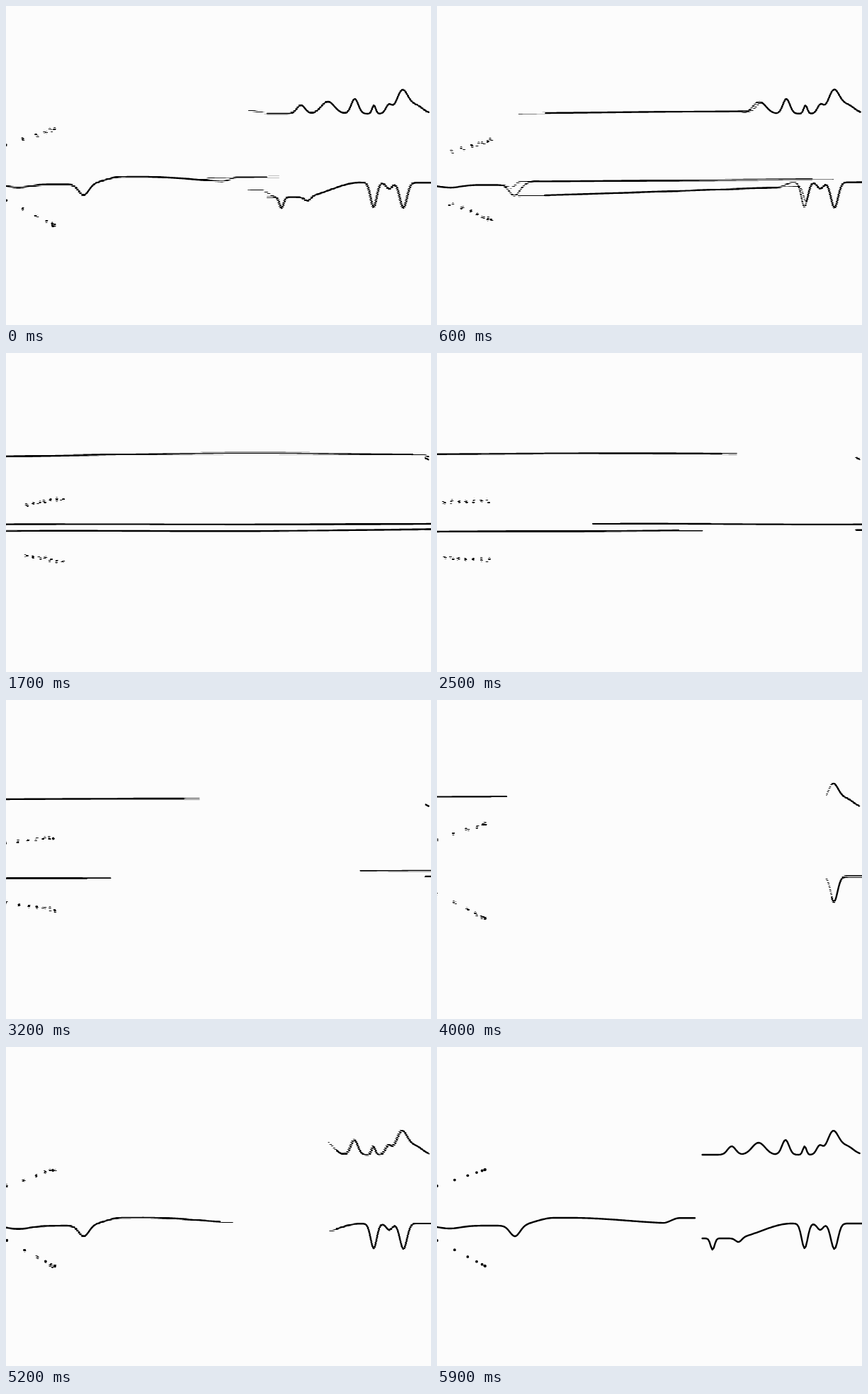
An HTML page with a canvas for the animation above (6 s loop, 600 by 450 pixels).

```html
<!DOCTYPE html>
<html lang="en">
<head>
<meta charset="utf-8">
<title>Line drawing loop</title>
<style>
html, body { margin: 0; width: 100%; height: 100%; overflow: hidden; background: #fcfcfc; }
canvas { display: block; width: 600px; height: 450px; }
</style>
</head>
<body>
<canvas id="stage" width="600" height="450"></canvas>
<script>
const W = 600, H = 450, LOOP = 6, FPS = 10;
const ctx = document.getElementById('stage').getContext('2d');

const ramp = (v, a, b) => Math.max(0, Math.min(1, (v - a) / (b - a)));
const smooth = (v, a, b) => { const k = ramp(v, a, b); return k * k * (3 - 2 * k); };
const mix = (a, b, k) => a + (b - a) * k;
const noise = n => { const v = Math.sin(n * 127.1 + 11.7) * 43758.5453; return (v - Math.floor(v)) * 2 - 1; };

// Bell-shaped hill (negative height) or notch in a line.
const bell = (x, centre, height, width) => height * Math.exp(-(((x - centre) / width) ** 2));

// Piecewise linear travel through [time, x] points.
function travel(u, points) {
  let x = points[0][1];
  for (let i = 1; i < points.length; i++)
    x += (points[i][1] - points[i - 1][1]) * ramp(u, points[i - 1][0], points[i][0]);
  return x;
}

// Both ridges are penned from the right edge, slowly at first.
const penLeft = u => travel(u, [[-2.5, 592], [-.8, 463], [0, 362], [.95, 0]]);

// u runs from -2.6 s (pen down) past 4 s (erased); "settled" tells how far
// the drawn shape has relaxed into the flat line at x.
const strokes = [
  { // upper ridge
    start: penLeft,
    end: u => travel(u, [[1.65, 595], [4.4, 0]]),
    shape: x => 152 + bell(x, 416, -12, 8) + bell(x, 454, -17, 13) + bell(x, 492, -21, 7)
      + bell(x, 519, -12, 3.5) + bell(x, 540, -12, 6) + bell(x, 559, -32, 11) + bell(x, 578, -12, 14),
    flat: (x, u) => 154 - 9 * ramp(u, 1.2, 1.7) - 8 * ramp(u, 1.7, 4)
      + x / W * (9 * ramp(u, 1.2, 2.5) - 6) - 2 * Math.sin(Math.PI * x / W),
    settled: (x, u) => smooth(350 + 150 * u - x, -12, 12)
  },
  { // middle line
    start: () => 0,
    end: u => travel(u, [[-1.9, 0], [-.8, 315], [0, 370], [.8, W], [1.75, W], [3.6, 0]]),
    shape: x => 252 - 11 * smooth(x, 110, 165) + 8 * smooth(x, 190, 350)
      + bell(x, 18, 4, 22) + bell(x, 110, 15, 10),
    flat: (x, u) => 243 + 9 * ramp(u, 0, 1.1) - 3 * x / W,
    settled: (x, u) => smooth(x - 300 + 300 * u, -12, 12)
  },
  { // lower ridge
    start: u => penLeft(u) + travel(u, [[1.9, 0], [3.4, W]]),
    end: () => W,
    shape: x => 270 - 21 * smooth(x, 415, 500) + bell(x, 389, 16, 4) + bell(x, 426, 6, 6)
      + bell(x, 519, 35, 6) + bell(x, 541, 9, 6) + bell(x, 561, 36, 7),
    flat: (x, u) => {
      const k = ramp(u, 1.1, 1.5);
      return 272 - 30 * k + x / W * (19 * k - 20);
    },
    settled: (x, u) => smooth(360 + 240 * u - x, -12, 12)
  }
];

function drawStroke(s, u, seed) {
  const x0 = s.start(u), x1 = s.end(u);
  if (x1 - x0 < 1) return;
  const dx = seed && 1.5 * noise(seed), dy = seed && noise(seed + 5), phase = 3 * noise(seed + 9);
  ctx.beginPath();
  for (let x = x0; x < x1 + 2; x += 2) {
    const y = mix(s.shape(x), s.flat(x, u), s.settled(x, u));
    ctx.lineTo(x + dx, y + dy * Math.sin(x / 110 + phase));
  }
  ctx.stroke();
}

// Dots: a short tilting row that opens into a fan and crowds at its far end.
const DOTS = 7;
const chains = [
  { row: 210, near: 196, far: 173, tilt: 5 },
  { row: 290, near: 273, far: 309, tilt: -5 }
];

function drawDots(c, t, seed) {
  const row = ramp(t, 0, 1.2) * (1 - ramp(t, 1.2, 2.9));
  const open = 1 - ramp(t, 0, 1.2) * (1 - ramp(t, 2.5, 4));
  const tilt = c.tilt * Math.cos(2 * Math.PI * (t - 1.2));
  const jitter = seed && 1.8;
  for (let i = 0; i < DOTS; i++) {
    const even = i / (DOTS - 1);
    const k = mix(even, 1 - (1 - even) ** 2.5, open);
    const x = 42 * row + (68 - 26 * row) * k;
    const y = mix(c.row + tilt * (2 * k - 1), mix(c.near, c.far, k), open);
    ctx.beginPath();
    ctx.arc(x + jitter * noise(seed + i), y + jitter * noise(seed + i + 20), 1.9, 0, 7);
    ctx.fill();
  }
}

function pose(time, seed) {
  const t = (time + LOOP) % LOOP;
  strokes.forEach((s, i) => {
    for (const u of [t, t - LOOP]) drawStroke(s, u, seed && seed + i * 71);
  });
  chains.forEach((c, i) => drawDots(c, t, seed && seed + 300 + i * 40));
}

// Alternate scan lines show two neighbouring poses.
const fields = [0, 1].map(parity => {
  const path = new Path2D();
  for (let y = 0; y < H; y++)
    if (Math.floor(y / 1.25) % 2 === parity) path.rect(0, y, W, 1);
  return path;
});

function render(k) {
  ctx.fillStyle = '#fcfcfc';
  ctx.fillRect(0, 0, W, H);
  ctx.fillStyle = ctx.strokeStyle = '#000';
  ctx.lineCap = ctx.lineJoin = 'round';
  ctx.lineWidth = 2.4;
  // Every fifth frame holds one whole, steady pose.
  if (k % 5 === 4) return pose(k / FPS, 0);
  fields.forEach((path, i) => {
    ctx.save();
    ctx.clip(path);
    pose((k + i - .5) / FPS, (k + i) % (LOOP * FPS) + 1);
    ctx.restore();
  });
}

const begin = performance.now();
let shown = -1;
function tick() {
  const k = Math.floor((performance.now() - begin) / 1000 * FPS) % (LOOP * FPS);
  if (k !== shown) render(shown = k);
  requestAnimationFrame(tick);
}
tick();
</script>
</body>
</html>
```
